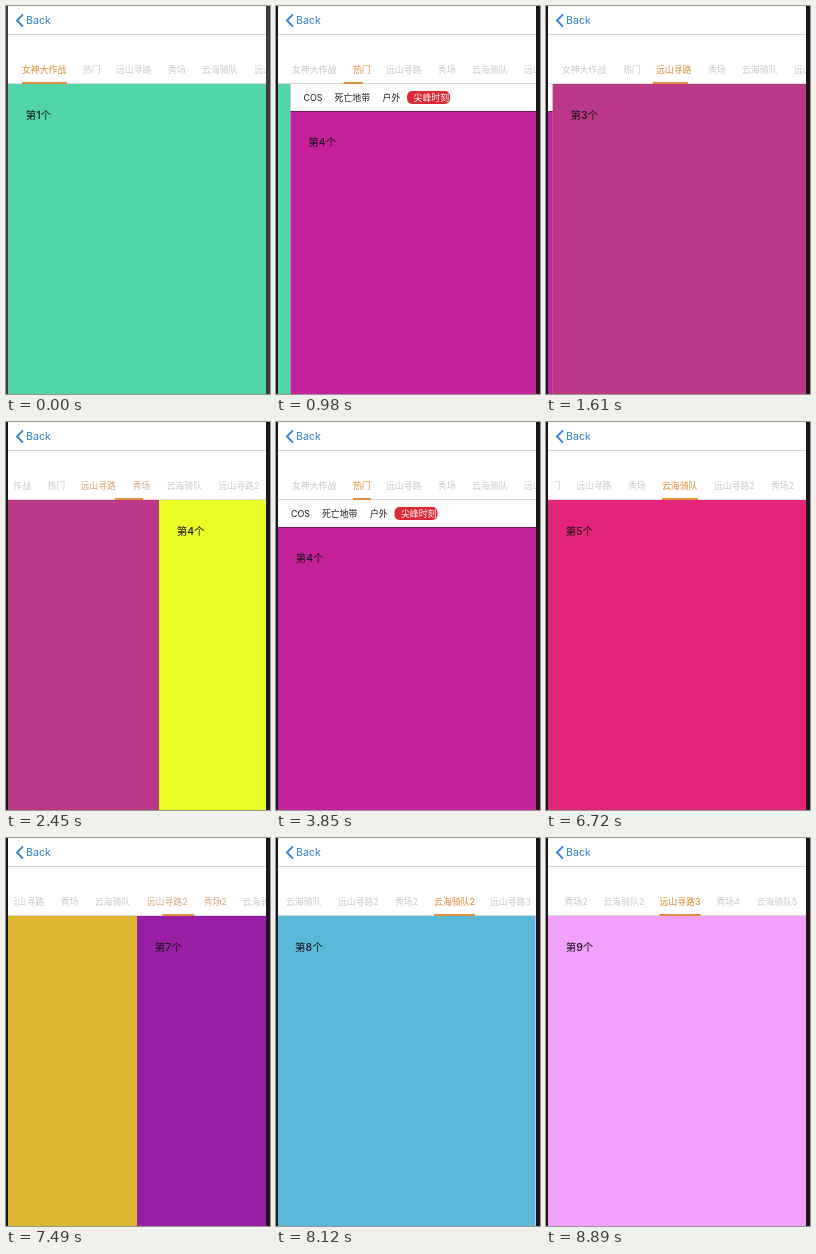
Animation, 264 px wide and 388 px high, one loop 9.87 s. Source, as an HTML page with a canvas:

```html
<!DOCTYPE html>
<html lang="zh-CN">
<head>
<meta charset="utf-8">
<title>Paged tabs</title>
<style>
html, body { margin: 0; width: 100%; height: 100%; overflow: hidden; background: #fff; }
canvas { display: block; width: 264px; height: 388px; }
</style>
</head>
<body>
<canvas id="stage"></canvas>
<script>
const W = 264, H = 388, LOOP = 9870, STEP = 70;
const LEFT = 2, RIGHT = 260, PAGE_W = RIGHT - LEFT, TOP = 78;
const FONT = 'Inter, "Noto Sans CJK SC", "Noto Sans CJK JP", sans-serif';

// label, left edge, width
const tabs = [
  ['女神大作战', 16, 45], ['热门', 77, 18], ['远山寻路', 110, 35.5], ['秀场', 162, 18],
  ['云海骑队', 196, 36], ['远山寻路2', 248, 41], ['秀场2', 305, 23], ['云海骑队2', 344, 41],
  ['远山寻路3', 400, 41], ['秀场4', 457, 23], ['云海骑队5', 497, 41]
];
const pageColors = ['#51d5a8', '#c5219b', '#bb3788', '#ebfd22', '#e2247b',
  '#ddb72f', '#981fa3', '#5ab8d8', '#efa1fb'];
const subTabs = [['COS', 15], ['死亡地带', 46], ['户外', 94]];

// start, end, page, time the tab strip takes to centre afterwards
const moves = [
  [70, 210, 0.016, 0], [530, 1050, 1, 420], [1120, 1653, 2, 420], [1680, 2080, 3, 420],
  [2250, 2609, 2, 420], [3000, 3500, 1, 70],
  [4270, 4640, 2, 50], [5530, 5800, 3, 220], [6370, 6580, 4, 140],
  [6930, 7280, 5, 420], [7300, 7680, 6, 420], [7740, 8050, 7, 420], [8110, 8470, 8, 420]
];

const canvas = document.getElementById('stage');
const ctx = canvas.getContext('2d');
const ratio = window.devicePixelRatio || 1;
canvas.width = W * ratio;
canvas.height = H * ratio;
ctx.scale(ratio, ratio);
ctx.textBaseline = 'middle';

const clamp = u => Math.max(0, Math.min(1, u));
const ease = u => { u = clamp(u); return u * u * (3 - 2 * u); };
const lerp = (a, b, u) => a + (b - a) * u;

function pageAt(t) {
  return moves.reduce((pos, [start, end, page]) =>
    lerp(pos, page, ease((t - start) / (end - start))), 0);
}

function scrollFor(page) {
  const [, x, w] = tabs[Math.round(page)];
  return Math.max(0, x + w / 2 - 134);
}

function scrollAt(t) {
  return moves.reduce((s, [, end, page, settle]) =>
    lerp(s, scrollFor(page), ease((t - end) / Math.max(settle, 1))), 0);
}

// Interpolates one column of the tab table at a fractional page
function tabValue(pos, column) {
  const i = Math.min(Math.floor(pos), tabs.length - 2);
  return lerp(tabs[i][column], tabs[i + 1][column], pos - i);
}

function rect(x, y, w, h, color) {
  ctx.fillStyle = color;
  ctx.fillRect(x, y, w, h);
}

function text(str, x, y, size, color, weight = 400) {
  ctx.font = `${weight} ${size}px ${FONT}`;
  ctx.fillStyle = color;
  ctx.fillText(str, x, y);
}

function clipped(x, y, w, h, draw) {
  ctx.save();
  ctx.beginPath();
  ctx.rect(x, y, w, h);
  ctx.clip();
  draw();
  ctx.restore();
}

function drawNav() {
  ctx.strokeStyle = '#2f80cb';
  ctx.lineWidth = 1.8;
  ctx.beginPath();
  ctx.moveTo(17, 8.3);
  ctx.lineTo(11, 14.5);
  ctx.lineTo(17, 20.7);
  ctx.stroke();
  text('Back', 20, 14.7, 10.6, '#2f80cb');
  rect(LEFT, 28, PAGE_W, 1, '#d4d4d6');
}

function tabColor(u) {
  const from = [200, 200, 200], to = [222, 138, 46];
  return `rgb(${from.map((c, i) => Math.round(lerp(c, to[i], u))).join()})`;
}

function drawTabs(pos, barPos, scroll) {
  rect(LEFT, 77, PAGE_W, 1, '#dcdcdc');
  clipped(8, 50, RIGHT - 8, 28, () => {
    tabs.forEach(([label, x], i) => {
      const u = clamp(1 - Math.abs(i - pos));
      text(label, x - scroll, 64.3, 8.9, tabColor(u), u > 0.5 ? 500 : 400);
    });
    rect(tabValue(barPos, 1) - scroll, 76, tabValue(pos, 2), 2, '#e0903a');
  });
}

function drawSubBar(x) {
  rect(x, TOP, PAGE_W, 27, '#fff');
  subTabs.forEach(([label, left]) => text(label, x + left - LEFT, 92, 8.9, '#1c1c1c'));
  ctx.fillStyle = '#dc2a34';
  ctx.beginPath();
  ctx.roundRect(x + 116.5, 85, 43, 13, 5);
  ctx.fill();
  text('尖峰时刻', x + 123, 92, 8.9, '#fff');
  rect(x, 105, PAGE_W, 1, '#7a1760');
}

function drawPage(i, x) {
  const nested = i === 1;
  rect(x, TOP, PAGE_W, H - TOP, pageColors[i]);
  if (nested) drawSubBar(x);
  text(`第${nested ? 4 : i + 1}个`, x + 17.7, nested ? 137 : 109.5, 10.5, '#1a1218', 500);
}

function drawPages(pos) {
  clipped(LEFT, TOP, PAGE_W, H - TOP, () => {
    pageColors.forEach((_, i) => {
      if (Math.abs(i - pos) < 1) drawPage(i, LEFT + (i - pos) * PAGE_W);
    });
  });
}

function draw(t) {
  const pos = pageAt(t);
  rect(0, 0, W, H, '#fff');
  drawNav();
  drawTabs(pos, pageAt(t - 60), scrollAt(t));
  drawPages(pos);
  const edge = t < 560 ? '#3e3e3e' : '#1c161b';
  rect(0, 0, LEFT, H, edge);
  rect(RIGHT, 0, W - RIGHT, H, edge);
}

const began = performance.now();
function tick() {
  const t = (performance.now() - began) % LOOP;
  draw(Math.floor(t / STEP) * STEP);
  requestAnimationFrame(tick);
}
tick();
</script>
</body>
</html>
```
